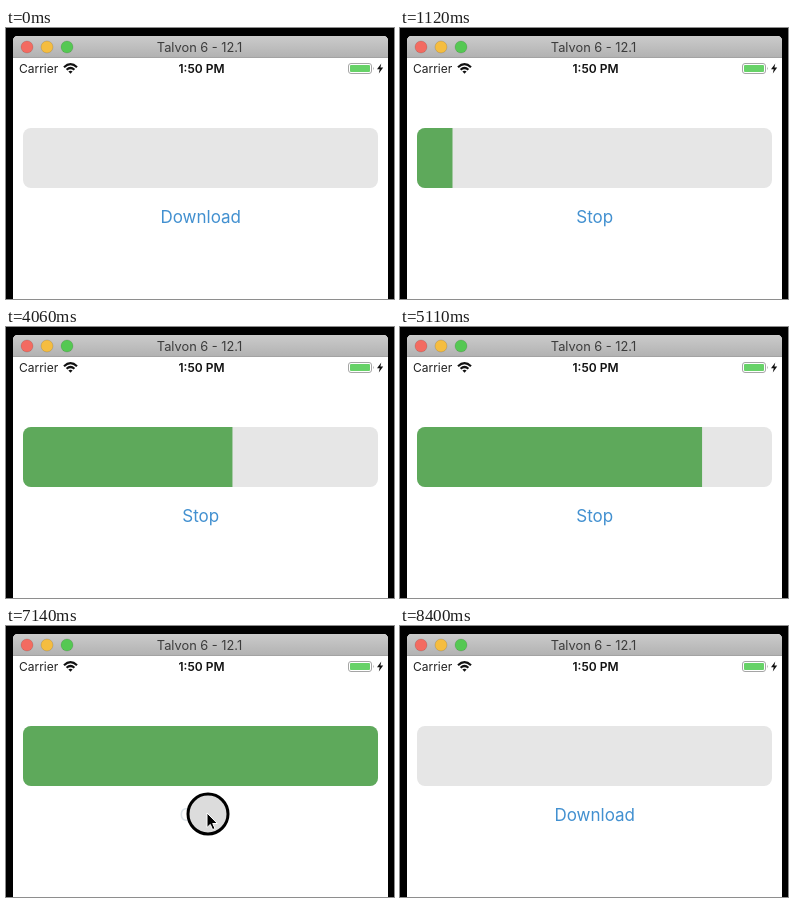
Animation of 388x271 px, one loop 8.47 s. Source, as an HTML page:

```html
<!DOCTYPE html>
<html lang="en">
<head>
<meta charset="utf-8">
<title>Download button</title>
<style>
  html, body { margin: 0; width: 100%; height: 100%; overflow: hidden; background: #000; }
  svg { display: block; font-family: Inter, Roboto, sans-serif; }
</style>
</head>
<body>
<svg width="388" height="271" viewBox="0 0 388 271">
  <defs>
    <linearGradient id="chrome" x2="0" y2="1">
      <stop stop-color="#cbcbcb"/>
      <stop offset="1" stop-color="#b1b1b1"/>
    </linearGradient>
    <clipPath id="track"><rect x="17" y="100" width="355" height="60" rx="8"/></clipPath>
  </defs>

  <path d="M7 271V13q0-5 5-5H377q5 0 5 5V271z" fill="#fff"/>
  <path d="M7 30V13q0-5 5-5H377q5 0 5 5V30z" fill="url(#chrome)"/>
  <path d="M7 29.5H382" stroke="#a3a3a3"/>
  <g stroke-opacity=".15" stroke="#000" stroke-width=".8">
    <circle cx="21" cy="19" r="6" fill="#f36b61"/>
    <circle cx="41" cy="19" r="6" fill="#f5bd40"/>
    <circle cx="61" cy="19" r="6" fill="#55c853"/>
  </g>
  <text x="193.5" y="24" font-size="12.8" text-anchor="middle" fill="#3c3c3c">Talvon 6 - 12.1</text>

  <text x="13" y="45" font-size="12" fill="#222">Carrier</text>
  <g fill="none" stroke="#111" stroke-width="2.2">
    <path d="M58 39.2q6.5-6 13 0M60.6 41.8q3.9-3.6 7.8 0"/>
    <path d="M64.5 45.8l-2.1-2.2q2.1-1.6 4.2 0z" fill="#111" stroke="none"/>
  </g>
  <text x="195.5" y="45" font-size="12" font-weight="600" text-anchor="middle" fill="#111">1:50 PM</text>
  <rect x="342.5" y="35.5" width="23" height="10" rx="2.5" fill="none" stroke="#a5a5a5"/>
  <rect x="344" y="37" width="20" height="7" rx="1" fill="#67d268"/>
  <path d="M367 38.7q1.6 1.8 0 3.6z" fill="#a5a5a5"/>
  <path d="M375.3 35.5l-4.3 5.7h2.7l-.9 4.3 4.4-5.9h-2.8z" fill="#111"/>

  <g clip-path="url(#track)">
    <path d="M17 100h355v60H17z" fill="#e6e6e6"/>
    <rect id="bar" x="17" y="100" height="60" fill="#5ea95b"/>
  </g>
  <text id="label" x="194.7" y="195.3" font-size="17" text-anchor="middle" fill="#4290d0"></text>

  <circle id="press" cx="202" cy="188" r="20" fill="#dcdcdc" stroke="#000" stroke-width="3"/>
  <path id="cursor" d="M0 0V14.5L3.3 11.4 5.6 16.6 8 15.5 5.7 10.5H10.4z"
        fill="#000" stroke="#fff" stroke-width="1"/>
</svg>
<script>
  const LOOP = 8470, STEP = 70, HOME = [201, 187];
  const $ = id => document.getElementById(id);
  const bar = $('bar'), label = $('label'), press = $('press'), cursor = $('cursor');

  // [start time, value]
  const progress = [[0, 0], [980, .1], [1960, .3], [3010, .4], [4060, .59], [5110, .803], [6090, 1], [7280, 0]];
  const titles = [[-1000, 'Download'], [630, 'Stop'], [6090, 'Clear'], [7280, 'Download']];
  const presses = [[490, 630], [7140, 7280]];
  // [start, end, from, to]
  const moves = [
    [70, 420, [-10, 223], HOME], [700, 1050, HOME, [-14, 229]],
    [6580, 7000, [94, 264], HOME], [7350, 7770, HOME, [-14, 237]]
  ];

  const latest = (list, t) => list.filter(item => item[0] <= t).pop();
  const clamp = x => Math.min(1, Math.max(0, x));
  const ease = x => x * x * (3 - 2 * x);

  function draw(t) {
    bar.setAttribute('width', 355 * latest(progress, t)[1]);

    const [since, title] = latest(titles, t);
    const pressed = presses.some(([a, b]) => t >= a && t < b);
    const fade = title === 'Clear' ? 70 : 280;
    label.textContent = title;
    label.setAttribute('fill', pressed ? '#dce3e8' : '#4290d0');
    label.setAttribute('opacity', pressed ? 1 : .2 + .8 * clamp((t - since) / fade));
    press.setAttribute('visibility', pressed ? 'visible' : 'hidden');

    const move = latest(moves, t);
    const shown = move && (move[3] === HOME || t < move[1]);
    cursor.setAttribute('visibility', shown ? 'visible' : 'hidden');
    if (shown) {
      const [start, end, from, to] = move;
      const k = ease(clamp((t - start) / (end - start)));
      const [x, y] = from.map((v, i) => v + (to[i] - v) * k);
      cursor.setAttribute('transform', `translate(${x} ${y})`);
    }
  }

  const origin = performance.now();
  function tick(now) {
    const t = Math.max(0, now - origin) % LOOP;
    draw(Math.floor(t / STEP) * STEP);
    requestAnimationFrame(tick);
  }
  draw(0);
  requestAnimationFrame(tick);
</script>
</body>
</html>
```
